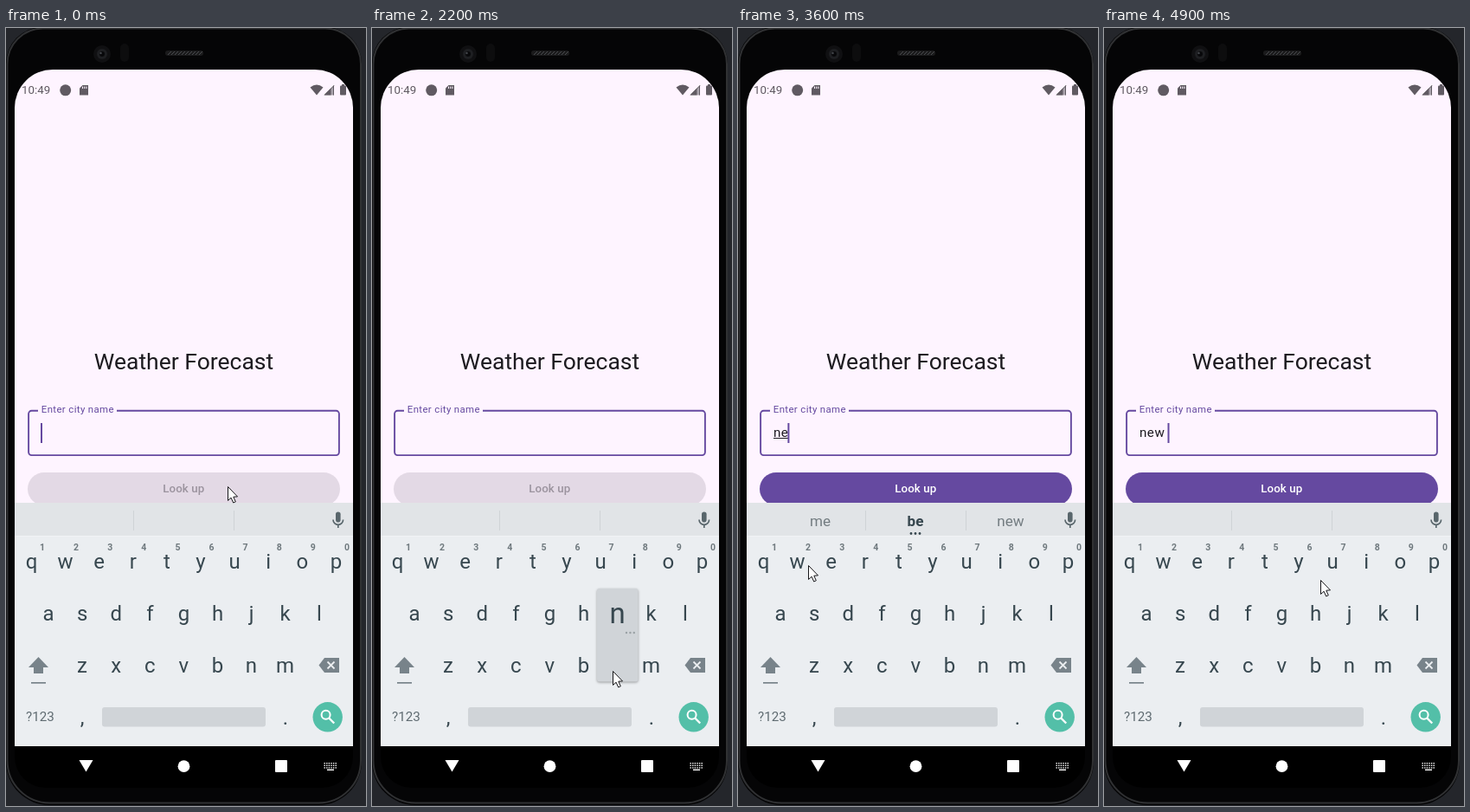
Write an HTML page with a canvas that moves like this. It is 416 px wide and 898 px high and loops after 5000 ms.

```html
<!DOCTYPE html>
<html lang="en">
<head>
<meta charset="utf-8">
<title>Weather Forecast</title>
<style>
html, body { margin: 0; width: 100%; height: 100%; overflow: hidden; background: #24262b; }
canvas { display: block; width: 416px; height: 898px; }
</style>
</head>
<body>
<canvas id="stage"></canvas>
<script>
const W = 416, H = 898, LOOP = 5000, STEP = 100;
const canvas = document.getElementById('stage');
const dpr = window.devicePixelRatio || 1;
canvas.width = W * dpr;
canvas.height = H * dpr;
const c = canvas.getContext('2d');

const INK = '#37474f', GREY = '#78838a', PURPLE = '#6549a0', PAGE = '#fef4ff', STATUS = '#605a62';
const FONT = 'Roboto, "Noto Sans", sans-serif';

// Pointer path: time, x, y
const PATH = [
  [1500, 257, 529], [2100, 279, 742], [2700, 279, 742], [3100, 113, 624], [3400, 113, 624],
  [3600, 82, 620], [3800, 82, 620], [4000, 160, 760], [4200, 180, 795], [4600, 180, 795], [4900, 251, 637]
];
// Typed text: time, text
const TYPED = [[0, ''], [2400, 'n'], [3300, 'ne'], [3800, 'new'], [4600, 'new ']];
const HINTS = [[0, []], [2500, ['not', 'in', 'on']], [3300, ['me', 'be', 'new']],
  [3800, ['newly', 'news', 'newspaper']], [4600, []]];
const CARET = [[0, true], [100, false], [400, true], [1000, false], [1400, true], [2000, false],
  [2400, true], [2900, false], [3300, true], [4300, false], [4600, true]];
const PRESSES = [[0, ''], [2100, 'n'], [2400, ''], [3200, 'e'], [3300, ''], [3700, 'w'], [3800, ''], [4500, ' '], [4600, '']];

const ROWS = [
  { keys: 'qwertyuiop', x: 29.5, y: 616 },
  { keys: 'asdfghjkl', x: 49, y: 676 },
  { keys: 'zxcvbnm', x: 88, y: 736 }
];
const PITCH = 39.1;

function at(list, t) {
  let value = list[0][1];
  for (const [time, v] of list) if (t >= time) value = v;
  return value;
}

function pointerAt(t) {
  if (t <= PATH[0][0]) return PATH[0].slice(1);
  for (let i = 1; i < PATH.length; i++) {
    const [t0, x0, y0] = PATH[i - 1], [t1, x1, y1] = PATH[i];
    if (t <= t1) {
      const u = (t - t0) / (t1 - t0), k = u * u * (3 - 2 * u);
      return [x0 + (x1 - x0) * k, y0 + (y1 - y0) * k];
    }
  }
  return PATH[PATH.length - 1].slice(1);
}

function box(x, y, w, h, r, fill) {
  c.beginPath();
  c.roundRect(x, y, w, h, r);
  c.fillStyle = fill;
  c.fill();
}

function edge(x, y, w, h, r, color, width) {
  c.beginPath();
  c.roundRect(x, y, w, h, r);
  c.strokeStyle = color;
  c.lineWidth = width;
  c.stroke();
}

function dot(x, y, r, fill) {
  c.beginPath();
  c.arc(x, y, r, 0, Math.PI * 2);
  c.fillStyle = fill;
  c.fill();
}

function poly(points, fill) {
  c.beginPath();
  points.forEach(([x, y]) => c.lineTo(x, y));
  c.closePath();
  c.fillStyle = fill;
  c.fill();
}

function line(x0, y0, x1, y1, color, width) {
  c.beginPath();
  c.moveTo(x0, y0);
  c.lineTo(x1, y1);
  c.strokeStyle = color;
  c.lineWidth = width;
  c.stroke();
}

function text(str, x, y, size, color, align = 'left', weight = 400, spacing = 0) {
  c.font = `${weight} ${size}px ${FONT}`;
  c.letterSpacing = spacing + 'px';
  c.textAlign = align;
  c.fillStyle = color;
  c.fillText(str, x, y);
  const width = c.measureText(str).width;
  c.letterSpacing = '0px';
  return width;
}

function drawPhone() {
  c.fillStyle = '#24262b';
  c.fillRect(0, 0, W, H);
  box(0, -1, 411, 898, [42, 42, 50, 50], '#050506');
  edge(1.5, 0.5, 408.5, 894, [41, 41, 49, 49], '#303133', 2);

  dot(111, 30, 10, '#101012');
  dot(111, 30, 6, '#1e1f22');
  dot(111, 30, 3, '#08080a');
  dot(109.5, 29, 1.2, '#45484d');
  box(132, 18, 10, 21, 5, '#0d0d0e');

  box(184, 26, 44, 6, 3, '#1b1b1c');
  for (let x = 187; x < 225; x += 4) line(x, 31, x + 4, 27, '#4a4c4f', 1);

  box(10, 48, 391, 781, [44, 44, 0, 0], PAGE);
  box(10, 829, 391, 48, [0, 0, 36, 36], '#000');
}

function drawStatus() {
  text('10:49', 18, 76, 13.3, STATUS);
  dot(68.7, 71.8, 6.5, STATUS);
  poly([[88.5, 66], [95, 66], [95, 77.5], [85, 77.5], [85, 69.5]], STATUS);
  for (let i = 0; i < 3; i++) {
    c.fillStyle = PAGE;
    c.fillRect(88 + i * 2.2, 67.5, 1, 2.5);
  }
  c.beginPath();
  c.moveTo(359, 77.5);
  c.lineTo(351.5, 68.5);
  c.quadraticCurveTo(359, 62.5, 366.5, 68.5);
  c.closePath();
  c.fillStyle = STATUS;
  c.fill();
  poly([[379, 66], [379, 77.5], [367.5, 77.5]], '#aaa3ac');
  poly([[375.5, 69.5], [375.5, 77.5], [367.5, 77.5]], STATUS);
  line(368.5, 77, 379, 66.5, STATUS, 1);
  line(378.5, 66.5, 378.5, 77.5, STATUS, 1);
  box(386, 66.5, 7, 11, 1, STATUS);
  box(388, 65, 3, 2, 0, STATUS);
}

function drawForm(str, caret) {
  text('Weather Forecast', 205.5, 394, 26.5, '#1d1b20', 'center');

  edge(26.1, 441.8, 358.8, 51.3, 3.5, PURPLE, 1.9);
  c.fillStyle = PAGE;
  c.fillRect(37, 438, 91, 6);
  text('Enter city name', 40.8, 444, 11.4, PURPLE, 'left', 400, 0.38);

  const width = str ? text(str, 41, 472, 15.2, '#1d1b20', 'left', 400, 0.475) : 0;
  if (str && !str.endsWith(' ')) {
    c.fillStyle = '#1d1b20';
    c.fillRect(41, 473, width, 1);
  }
  if (caret) {
    c.fillStyle = PURPLE;
    c.fillRect(40 + width, 456, 2, 23);
  }

  box(25, 513, 361, 38, 19, str ? PURPLE : '#e3d9e5');
  text('Look up', 205.3, 536, 13.3, str ? '#fff' : '#9b939e', 'center', 500, 0.095);
}

function drawHints(words) {
  c.fillStyle = '#e1e4e7';
  c.fillRect(10, 548, 391, 38);
  c.fillStyle = '#f1f3f5';
  c.fillRect(10, 586, 391, 1);
  c.fillStyle = '#cfd3d6';
  c.fillRect(147, 557, 1, 23);
  c.fillRect(263, 557, 1, 23);
  words.forEach((word, i) => {
    const bold = word === 'be';
    text(word, 95 + i * 110, 575, 17.1, bold ? INK : '#737c81', 'center', bold ? 700 : 400);
  });
  if (words.length) for (let i = -1; i < 2; i++) dot(205 + i * 5, 583.5, 1.4, INK);

  const mic = '#59666c';
  box(381, 558.5, 5.6, 12, 2.8, mic);
  c.beginPath();
  c.arc(383.8, 567.5, 5.8, 0, Math.PI);
  c.strokeStyle = mic;
  c.lineWidth = 1.7;
  c.stroke();
  line(383.8, 573, 383.8, 577, mic, 1.7);
}

function drawSearch() {
  dot(371.7, 795.3, 17.2, '#53bfa8');
  c.beginPath();
  c.arc(369.6, 792.8, 5, 0, Math.PI * 2);
  c.strokeStyle = '#fff';
  c.lineWidth = 2;
  c.stroke();
  line(373.2, 796.5, 379.2, 802.5, '#fff', 2.4);
}

function drawKeys(pressed) {
  c.fillStyle = '#ebeef1';
  c.fillRect(10, 587, 391, 242);
  for (const { keys, x, y } of ROWS) {
    [...keys].forEach((key, i) => text(key, x + i * PITCH, y + 8, 24, INK, 'center'));
  }
  for (let i = 0; i < 10; i++) {
    text(String((i + 1) % 10), 42 + i * PITCH, 603, 10.5, '#6f797e', 'center', 700);
  }

  poly([[37.5, 726], [49, 738], [43, 738], [43, 745], [32, 745], [32, 738], [26, 738]], GREY);
  c.fillStyle = GREY;
  c.fillRect(29, 755, 17, 1.7);

  poly([[368, 727], [385, 727], [385, 744], [368, 744], [361.5, 735.5]], GREY);
  line(371.5, 731.5, 379.5, 739.5, '#ebeef1', 1.8);
  line(379.5, 731.5, 371.5, 739.5, '#ebeef1', 1.8);

  text('?123', 39.5, 800, 15.2, '#5f6b71', 'center');
  text(',', 88, 804, 24, INK, 'center');
  text('.', 323, 804, 24, INK, 'center');
  box(111, 784, 189, 22.5, 3, pressed === ' ' ? '#bbc0c4' : '#d0d4d8');
  drawSearch();
}

function drawPopup(key) {
  const row = ROWS.find(r => r.keys.includes(key));
  if (!row || !key.trim()) return;
  const x = row.x + row.keys.indexOf(key) * PITCH, y = row.y;
  c.save();
  c.shadowColor = 'rgba(0,0,0,.35)';
  c.shadowBlur = 3 * dpr;
  c.shadowOffsetY = dpr;
  box(x - 23.5, y - 89, 47.5, 107.5, 3, '#d0d4d8');
  c.restore();
  text(key, x, y - 49, 33, INK, 'center');
  for (let i = 0; i < 3; i++) dot(x + 10.5 + i * 4.4, y - 38, 1.2, '#9aa1a5');
}

function drawNav() {
  poly([[84.5, 845], [100.5, 845], [92.5, 858.5]], '#fff');
  dot(205.5, 852.2, 6.9, '#fff');
  box(311, 845, 14, 14, 1, '#fff');
  c.fillStyle = '#fff';
  for (let row = 0; row < 3; row++) {
    for (let i = 0; i < 6; i++) c.fillRect(367.5 + i * 2.6, 848 + row * 2.6, 1.4, 1.4);
  }
  c.fillRect(371, 855.6, 8, 1.4);
}

function drawPointer(x, y) {
  c.save();
  c.translate(Math.round(x), Math.round(y));
  const shape = [[-0.5, 0.5], [-0.5, 16.5], [3.1, 13.2], [5.7, 19], [8.3, 17.8], [5.8, 12.2], [10.5, 11.9]];
  poly(shape, '#fff');
  c.strokeStyle = '#17171a';
  c.lineWidth = 1;
  c.lineJoin = 'miter';
  c.stroke();
  c.restore();
}

function render(now) {
  const t = Math.floor((now % LOOP) / STEP) * STEP;
  const pressed = at(PRESSES, t);
  c.setTransform(dpr, 0, 0, dpr, 0, 0);
  drawPhone();
  drawStatus();
  drawForm(at(TYPED, t), at(CARET, t));
  drawHints(at(HINTS, t));
  drawKeys(pressed);
  drawPopup(pressed);
  drawNav();
  drawPointer(...pointerAt(t));
}

const start = performance.now();
function tick() {
  render(performance.now() - start);
  requestAnimationFrame(tick);
}
tick();
</script>
</body>
</html>
```
